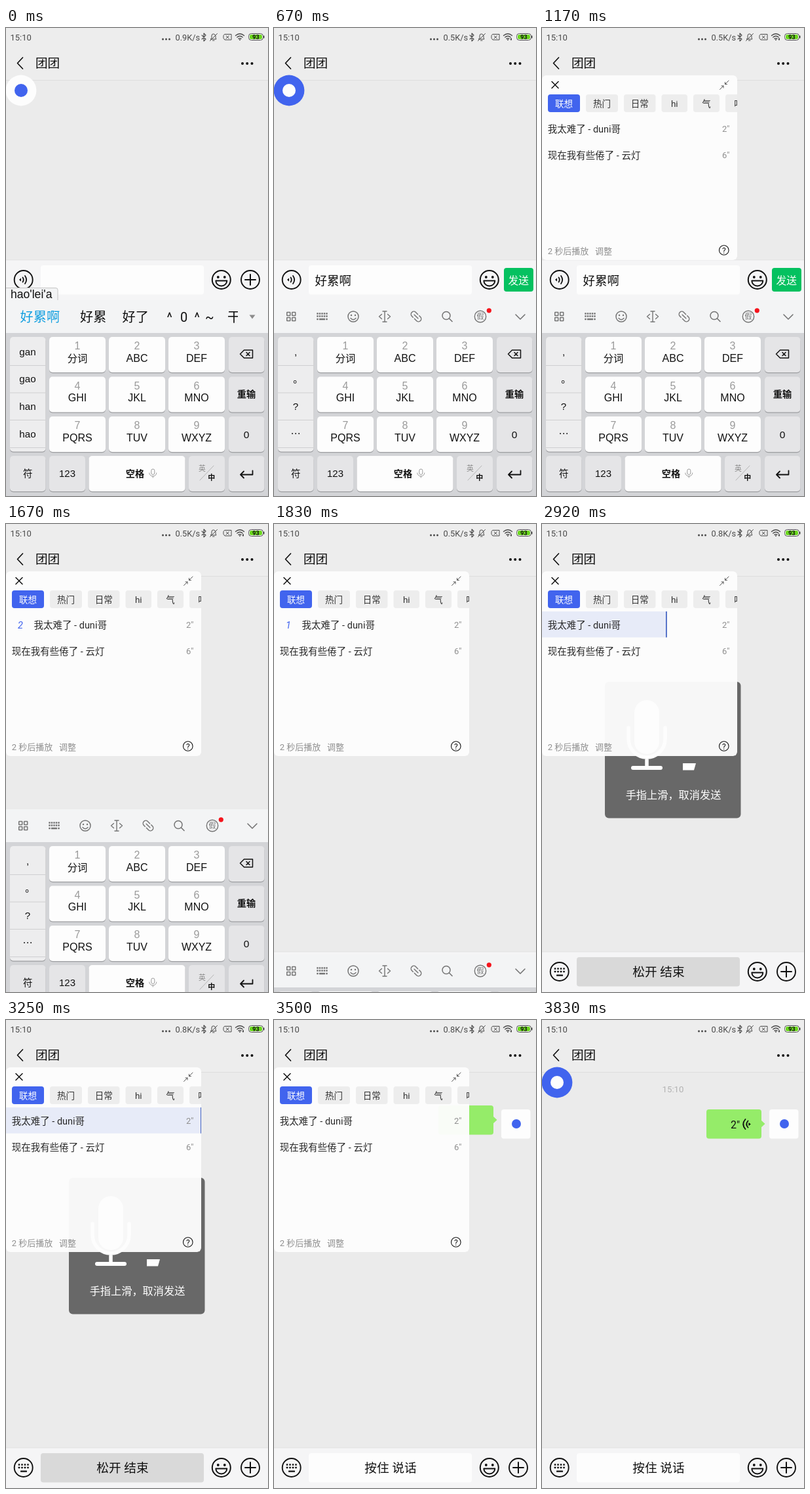
Animation of 400 by 712 pixels, one loop 4080 ms. Source, as an HTML page:

```html
<!DOCTYPE html>
<html lang="zh-CN">
<head>
<meta charset="utf-8">
<title>Voice chat</title>
<style>
html, body { margin: 0; width: 100%; height: 100%; overflow: hidden; background: #ebebeb; }
svg { display: block; width: 100%; height: 100%; }
text { font-family: Roboto, "Noto Sans CJK SC", "Noto Sans CJK", "Noto Sans CJK JP", sans-serif; white-space: pre; }
.mid { text-anchor: middle; }
.key { font-family: "Liberation Sans", Arial, "Noto Sans CJK SC", "Noto Sans CJK", sans-serif; }
.line { fill: none; stroke-linecap: round; stroke-linejoin: round; }
</style>
</head>
<body>
<svg id="stage" viewBox="0 0 400 712"></svg>
<script>
const TICK = 1000 / 12, LOOP = 4080;
const BLUE = '#4164ee', GREEN = '#05c160', INK = '#111';

// Markup helpers
const text = (x, y, size, s, fill = INK, more = '') =>
  `<text x="${x}" y="${y}" font-size="${size}" fill="${fill}" ${more}>${s}</text>`;
const mid = (x, y, size, s, fill, more = '') => text(x, y, size, s, fill, 'class="mid" ' + more);
const keyText = (x, y, size, s, fill) => text(x, y, size, s, fill, 'class="mid key"');
const rect = (x, y, w, h, r, fill, more = '') =>
  `<rect x="${x}" y="${y}" width="${w}" height="${h}" rx="${r}" fill="${fill}" ${more}/>`;
const dot = (x, y, r, fill, more = '') => `<circle cx="${x}" cy="${y}" r="${r}" fill="${fill}" ${more}/>`;
const line = (d, w = 1.5, color = INK, more = '') =>
  `<path class="line" d="${d}" stroke="${color}" stroke-width="${w}" ${more}/>`;
const ring = (x, y, r, w, color = INK) =>
  `<circle class="line" cx="${x}" cy="${y}" r="${r}" stroke="${color}" stroke-width="${w}"/>`;
const group = (id, s, more = '') => `<g id="${id}" ${more}>${s}</g>`;
const grid = (xs, ys, size, fill) =>
  ys.map(y => xs.map(x => rect(x - size / 2, y - size / 2, size, size, .4, fill)).join('')).join('');

function statusBar() {
  const c = '#4a4a4a';
  return text(6.5, 19, 13, '15:10', c) +
    [239.5, 244.5, 249.5].map(x => dot(x, 17, 1.5, c)).join('') +
    text(258.5, 18.5, 12.8, '0.9K/s', c, 'id="speed"') +
    line('M299 11 L305 17 L302 20 V8 L305 11 L299 17', 1.1, c) +
    line('M312.5 17 H321 L320 15 V12 Q319 9 316.5 9 Q314 9 314 12 V15 Z M315.5 19 H318 M322.5 8.5 L311.5 19.5', 1, c) +
    line('M334 9.5 H344 V18 H334 L332 15.5 V12 Z M336 11.8 L340.5 16 M340.5 11.8 L336 16', 1, c) +
    line('M350.5 11.5 Q357 6 363.5 11.5 M352.8 14 Q357 10.5 361.2 14 M355 16.4 Q357 14.8 359 16.4', 1.4, c) +
    dot(357, 18, 1, c) + rect(361, 15.5, 2, 3, 0, c, 'id="traffic"') +
    rect(370.5, 8.5, 22, 10, 4, '#fff', `stroke="${c}"`) + rect(372, 10, 19, 7, 2.5, '#6ad61d') +
    rect(393, 11.5, 1.5, 4, .5, c) + mid(381.5, 17, 9, '93', INK, 'font-weight="700"');
}

function header() {
  return rect(0, 0, 400, 79.5, 0, '#ededed') + rect(0, 79, 400, 1, 0, '#dedede') + statusBar() +
    line('M25.5 45 L17.5 53.5 L25.5 62', 1.7) + text(45, 60, 18.6, '团团') +
    [361, 368.2, 375.5].map(x => dot(x, 54, 2, INK)).join('');
}

function bubble() {
  return group('message',
    mid(200, 110, 13.2, '15:10', '#b2b2b2') +
    group('bubble', rect(251, 136, 84, 44.5, 4, '#95ec69') +
      '<path d="M334 152 L340.5 158 L334 164 Z" fill="#95ec69"/>' +
      group('length', text(288, 164.5, 16, '2"') +
        line('M310.5 151 Q304 158.5 310.5 166 M314.5 153.5 Q310 158.5 314.5 163.5', 1.8) +
        '<path d="M318.8 158.5 L315.5 156 V161 Z"/>')) +
    rect(347, 136, 44.5, 44.5, 4, '#fdfdfd') + dot(370, 158, 7, BLUE));
}

function recorder() {
  return group('recorder', rect(96, 240, 207.5, 207.5, 6, '#686868') +
    rect(141, 268, 38, 82, 19, '#fff') +
    line('M132 310 V327 A28 28 0 0 0 188 327 V310 M160 355 V370', 5.5, '#fff') +
    rect(136, 368, 48, 6, 3, '#fff') +
    '<path d="M215 364 H235 L232 374.5 H215 Z" fill="#fff"/>' +
    mid(200.5, 417.5, 16.2, '手指上滑，取消发送', '#fff'));
}

function inputBar() {
  const cy = 383;
  const voice = ring(26.7, cy, 14, 1.9) +
    line('M25.5 379.5 Q28 383 25.5 386.5 M29 377 Q33.3 383 29 389', 1.8) +
    '<path d="M20 383 L23 380.5 V385.5 Z"/>';
  const keys = ring(26.7, cy, 14, 1.9) + grid([20, 24.5, 29, 33.5], [378.5, 383], 2.5, INK) +
    rect(22, 387.5, 10, 2.2, .5, INK);
  const face = ring(328.8, cy, 14, 2) + dot(323.8, 379, 1.9, INK) + dot(333.8, 379, 1.9, INK) +
    line('M320.3 384.5 H337.3 A8.5 8 0 0 1 320.3 384.5 Z', 1.9);
  return group('bar', rect(0, 352.5, 400, 62, 0, '#f5f5f6') + rect(0, 352.5, 400, .8, 0, '#dcdcdc') +
    group('voice', voice) + group('keys', keys) +
    rect(53, 361, 249, 44.5, 4, '#fdfdfd', 'id="field"') +
    text(62.5, 390.5, 18.5, '好累啊', INK, 'id="typed"') +
    rect(119.5, 371, 1.6, 26, 0, GREEN, 'id="caret"') +
    mid(178, 688, 18.7, '', INK, 'id="hold" transform="translate(0 -298)"') + face +
    group('plus', ring(373, cy, 14, 1.9) + line('M365 383 H381 M373 375 V391', 2)) +
    group('send', rect(351, 365, 45, 36, 4, GREEN) + mid(373.3, 389.5, 15.8, '发送', '#fff')));
}

function toolbar() {
  const c = '#757575', y = 439;
  const boxes = [20, 28].map(x => [433, 441].map(v =>
    rect(x - .3, v - .5, 5, 5, .6, 'none', `stroke="${c}" stroke-width="1.5"`)).join('')).join('');
  return group('toolbar', boxes +
    grid([66.5, 70, 73.5, 77, 80.5], [434.5, 438.5], 2.5, c) + grid([66.5, 80.5], [443], 2.5, c) +
    rect(69, 441.8, 9, 2.5, 0, c) +
    ring(121, y, 8, 1.5, c) + dot(118, 437, 1.2, c) + dot(124, 437, 1.2, c) +
    line('M117 441.5 Q121 446 125 441.5', 1.4, c) +
    line('M166 431 H172 M169 431 V447 M166 447 H172 M164.5 435.5 L160.5 439 L164.5 442.5 M173.5 435.5 L177.5 439 L173.5 442.5', 1.4, c) +
    line('M-.5 -4.2 H-5 A4.2 4.2 0 0 0 -5 4.2 H-2.5 M.5 4.2 H5 A4.2 4.2 0 0 0 5 -4.2 H2.5 M-4 0 H4',
      1.5, c, 'transform="translate(217 439) rotate(45)"') +
    ring(263, 437.5, 6, 1.5, c) + line('M267.5 442 L272 446.5', 1.6, c) +
    ring(315, y, 8.7, 1.4, c) + mid(315, 443, 11, '假', c, 'font-weight="500"') +
    dot(328.3, 429.8, 3.6, '#f5141c') + line('M369 436 L376 443 L383 436', 1.6, c));
}

function candidates() {
  return group('candidates',
    text(21.5, 447, 20.2, '好累啊', '#129fe0') + text(113, 447, 20.2, '好累') + text(177.5, 447, 20.2, '好了') +
    text(245.5, 447, 20, '^') + text(266, 447, 20, '0') + text(287.5, 447, 20, '^') + text(304, 447, 20, '~') +
    '<svg x="335" y="424" width="19" height="30">' + text(3, 23, 20.2, '干') + '</svg>' +
    '<path d="M371.5 436.5 H380.5 L376 442.5 Z" fill="#8b8b8b"/>');
}

function keyboard() {
  const key = (x, y, w, h, fill) => rect(x, y + 1.2, w, h, 5, '#9d9ea1') + rect(x, y, w, h, 5, fill);
  const white = '#fdfdfd', grey = '#e5e5e7', bold = 'font-weight="700"';
  let s = rect(0, 414, 400, 50, 0, '#f3f4f5') + rect(0, 464, 400, 248, 0, '#d3d4d7');
  s += key(6, 470, 54.5, 174.5, '#ededee') +
    [513, 554.5, 596, 638].map(y => rect(6, y, 54.5, 1, 0, '#cfcfd1')).join('');
  const column = (id, labels) => group(id, labels.map((v, i) => keyText(33, 497.5 + i * 41.7, 15.2, v)).join(''));
  s += column('letters', ['gan', 'gao', 'han', 'hao']) + column('marks', [',', '｡', '?', '⋯']);
  ['分词', 'ABC', 'DEF', 'GHI', 'JKL', 'MNO', 'PQRS', 'TUV', 'WXYZ'].forEach((v, i) => {
    const x = 66 + i % 3 * 91, y = 470 + Math.floor(i / 3) * 60.5;
    s += key(x, y, 86, 54, white) + keyText(x + 43, y + 19, 16, i + 1, '#9a9a9a') +
      keyText(x + 43, y + 37.7, i ? 16 : 15.3, v);
  });
  for (let i = 0; i < 3; i++) s += key(340, 470 + i * 60.5, 54.5, 54, grey);
  s += line('M357.5 496 L363.5 490 H376.5 V502 H363.5 Z M367 493.5 L372 498.5 M372 493.5 L367 498.5', 1.5) +
    mid(367, 562, 14.2, '重输', INK, bold) + keyText(367, 623.5, 15.5, '0');
  s += [[6, 54.5], [66, 55], [126.5, 147], [279, 55], [340, 54.5]]
    .map(([x, w], i) => key(x, 651, w, 54, i === 2 ? white : grey)).join('');
  s += mid(33.3, 682.5, 14.5, '符') + keyText(93.5, 682.8, 15, '123') +
    mid(197, 682.5, 14.2, '空格', INK, bold) +
    rect(221.8, 671, 5, 8.5, 2.5, 'none', 'stroke="#999"') +
    line('M218.8 677 A5.5 5 0 0 0 229.8 677 M224.3 682 V684', 1, '#999') +
    mid(299.5, 673.5, 10.8, '英', '#8a8a8a') + line('M296 688 L317 666', 1, '#b5b5b5') +
    mid(313.8, 687.5, 11, '中', INK, bold) +
    line('M376.5 673.5 V679.5 H358 M363 674.5 L358 679.5 L363 684.5', 1.8);
  return group('keyboard', s + toolbar() + candidates());
}

function panel() {
  const tabs = [['联想', 9, 49], ['热门', 67, 49], ['日常', 125, 48.5], ['hi', 182.5, 39.5], ['气', 231, 40], ['哈', 280, 40]];
  const rowText = '#2a2a2a', pale = '#8f8f8f';
  return '<clipPath id="window"><rect id="hole" y="72" rx="6"/></clipPath>' +
    group('panel', rect(0, 72, 298, 281, 6, '#fdfdfd', 'opacity=".96"') +
      line('M15 81.5 L25 91.5 M25 81.5 L15 91.5', 1.5) +
      line('M285 80 L279.5 85.5 M279.5 82.5 V85.5 H282.5 M271.5 93.5 L277 88 M274 88 H277 V91', .9, '#444') +
      tabs.map(([s, x, w], i) => rect(x, 101, w, 27, 4, i ? '#ededed' : BLUE) +
        mid(x + w / 2, 120, 13.5, s, i ? '#333' : '#fff')).join('') +
      group('progress', rect(0, 133, 0, 39.5, 0, '#e7ebf8', 'id="played"') +
        rect(0, 133, 1.8, 39.5, 0, '#4766c4', 'id="head"')) +
      text(18, 158.5, 14.5, '2', BLUE, 'id="count" font-style="italic"') +
      text(9, 158.5, 14.5, '我太难了 - duni哥', rowText, 'id="song"') +
      text(8.7, 198.5, 14.5, '现在我有些倦了 - 云灯', rowText) +
      text(275, 157.5, 13, '2"', pale) + text(275, 197.5, 13, '6"', pale) +
      text(8.7, 344, 13, '2 秒后播放', pale) + text(81, 344, 13, '调整', pale) +
      ring(277.8, 338, 7.3, 1.1) + mid(277.8, 342.5, 12, '?'),
      'clip-path="url(#window)"');
}

const pinyin = () => group('pinyin', rect(-4, 395.5, 83, 24, 3, '#f3f4f5', 'stroke="#c4c4c4"') +
  text(7, 410.5, 17.6, "hao'lei'a", INK, 'class="key"'));

const orb = () => group('orb', dot(23, 95, 23.4, '#fdfdfd', 'id="disc"') + dot(23, 95, 10, BLUE, 'id="core"'));

document.getElementById('stage').innerHTML =
  rect(0, 0, 400, 712, 0, '#ebebeb') + header() + bubble() + recorder() + inputBar() +
  pinyin() + keyboard() + panel() + orb();

const $ = {};
document.querySelectorAll('[id]').forEach(el => $[el.id] = el);

const set = (id, attrs) => { for (const a in attrs) $[id].setAttribute(a, attrs[a]); };
const show = (id, on) => { $[id].style.display = on ? '' : 'none'; };
const shift = (id, y) => set(id, { transform: `translate(0 ${y})` });
const label = (id, s) => { if ($[id].textContent !== s) $[id].textContent = s; };
const between = (k, a, b) => k >= a && k < b;
const mix = (a, b, p) => 'rgb(' + a.map((v, i) => Math.round(v + (b[i] - v) * p)) + ')';

// Each row: tick, value held from then on
const track = {
  speed: [[0, '0.9'], [4, '0.5'], [29, '0.8']],
  orbBlue: [[0, 0], [3, .2], [4, .45], [5, .7], [6, .9], [7, 1]],
  size: [[0, 0], [9, .38], [10, .8], [11, 1], [43, .75], [44, .33], [45, 0]],
  songX: [[0, 8.7], [15, 22], [16, 36], [17, 42.5], [27, 8.7]],
  keysY: [[0, 0], [20, 20], [21, 115], [22, 241], [23, 300]]
};
const at = (name, k) => track[name].reduce((v, [tick, next]) => k >= tick ? next : v, 0);

function draw(k) {
  const typed = k >= 1, voiceMode = k >= 20, pressed = between(k, 25, 42);

  label('speed', at('speed', k) + 'K/s');
  show('traffic', k >= 4);

  shift('bar', voiceMode ? 298 : 0);
  show('voice', !voiceMode);
  show('keys', voiceMode);
  show('typed', typed && !voiceMode);
  show('caret', between(k, 1, 8) || between(k, 11, 14) || between(k, 17, 20));
  show('send', between(k, 2, 20));
  show('plus', k < 2 || voiceMode);
  set('field', { fill: pressed ? '#d9d9d9' : '#fdfdfd' });
  label('hold', !voiceMode ? '' : pressed ? '松开 结束' : '按住 说话');

  shift('keyboard', at('keysY', k));
  for (const id of ['pinyin', 'candidates', 'letters']) show(id, !typed);
  for (const id of ['toolbar', 'marks']) show(id, typed);

  show('recorder', between(k, 27, 42));
  show('message', k >= 42);
  show('length', k >= 43);
  shift('bubble', k < 43 ? -6 : 0);

  const size = at('size', k), p = at('orbBlue', k);
  show('panel', size);
  set('hole', { width: 46 + 252 * size, height: 46 + 235 * size });
  show('orb', !size);
  set('disc', { fill: mix([253, 253, 253], [65, 100, 238], p) });
  set('core', { fill: mix([65, 100, 238], [253, 253, 253], p) });

  set('song', { x: at('songX', k) });
  show('count', between(k, 15, 27));
  set('count', { opacity: Math.min(1, (k - 14) / 3) });
  label('count', k < 21 ? '2' : '1');

  const edge = Math.min(298, 190 + 37 * (Math.min(k, 37) - 35) + (k > 38 ? 34 : 0));
  show('progress', between(k, 30, 40));
  set('played', { width: Math.max(0, edge) });
  set('head', { x: edge - 1 });
}

let last = -1;
function frame() {
  const k = Math.floor((performance.now() % LOOP + 4) / TICK);
  if (k !== last) draw(last = k);
  requestAnimationFrame(frame);
}
frame();
</script>
</body>
</html>
```
